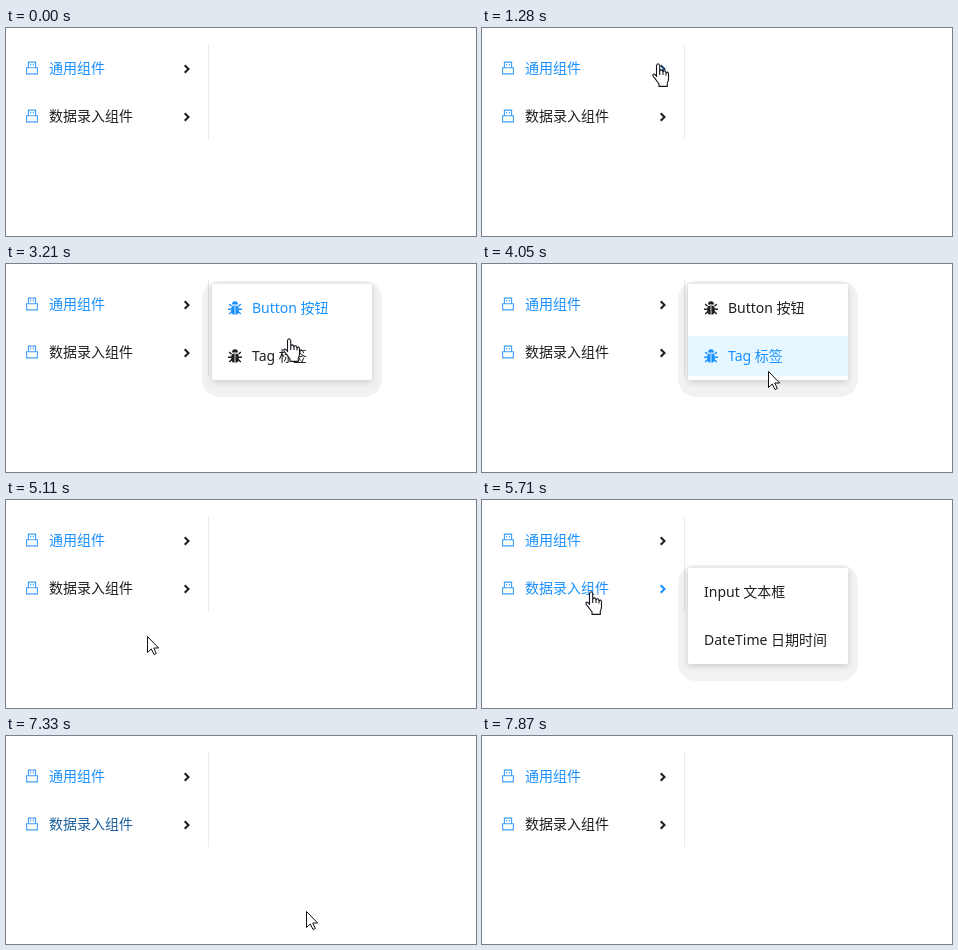
Recreate the animation shown at these times as an HTML page. Size 470x208 px, loop 8000 ms.

```html
<!DOCTYPE html>
<html lang="zh">
<head>
<meta charset="utf-8">
<style>
  html, body { margin: 0; width: 100%; height: 100%; overflow: hidden; background: #fff; }
  svg { display: block; }
  text { font: 14px "Noto Sans", "Noto Sans CJK SC", "Noto Sans CJK", sans-serif; white-space: pre; }
  .panel { fill: #fff; filter: drop-shadow(0 2px 3px rgba(0, 0, 0, .16)); }
</style>
</head>
<body>
<svg width="470" height="208" viewBox="0 0 470 208">
  <defs>
    <g id="usb" fill="none" stroke="#3f9ffa" stroke-width="1.1">
      <path d="M.6 6.2H11.4V12.4H.6ZM2.4 6V.6H9.6V6"/>
      <path d="M4 3.2H5.2M6.8 3.2H8" stroke-width="1.3"/>
    </g>
    <path id="chevron" d="M1.2 1.2 5 5 1.2 8.8" fill="none" stroke="currentColor" stroke-width="2.1"/>
    <g id="bug" fill="currentColor">
      <path d="M4 3.6a3 3.4 0 0 1 6 0Z"/>
      <rect x="3.2" y="4.4" width="7.6" height="9.2" rx="3.4"/>
      <path d="M3.5 5.2 1.2 3M3.5 8.2H0M3.8 10.6 1.2 13M10.5 5.2 12.8 3M10.5 8.2H14M10.2 10.6 12.8 13"
        fill="none" stroke="currentColor" stroke-width="1.4"/>
      <path d="M7 4.4V13.6" stroke="#fff" stroke-width=".8"/>
    </g>
  </defs>
  <path d="M202.5 16V111.5" stroke="#ebebeb"/>
  <g id="menu"></g>
  <g id="popups"></g>
  <g id="arrow"><path d="M.5.5V16.5L4.3 13 7 18.5 9.3 17.5 6.8 12H11.7Z" fill="#fff" stroke="#111"/></g>
  <g id="hand" stroke="#14141f" stroke-width="1.1" stroke-linejoin="round">
    <path fill="#fff" d="M4.5 14V2.5Q6 -1 7.7 2.5V8Q9.5 5.5 11 8.6Q13 6.5 14 9.7Q16.5 8 16.5 11.3V15.5Q16.5 18 15.3 20V23.4H7V20.8Q5.5 19.5 4 16.8L1 13Q.5 9 4.5 13"/>
    <path fill="none" d="M7.7 8V12M11 8.6V12M14 9.7V12.5"/>
  </g>
</svg>
<script>
const LOOP = 8000, STEP = 120, BLUE = '#1890ff', INK = '#1f1f1f';
const $ = id => document.getElementById(id);
const clamp = v => Math.min(1, Math.max(0, v));

// Ramp up at `on`, back down at `off`.
const level = (t, on, off, dur) => clamp((t - on) / dur) - clamp((t - off) / dur);
const tint = p => `color-mix(in srgb, ${BLUE} ${p * 100}%, ${INK})`;

// Pointer strokes: time, shape, left, top, then optionally sample count and end point.
const strokes = [
  [0, ''],
  [500, 'arrow', 189, 185, 2, 261, 104],
  [770, 'arrow', 250, 40, 4, 191, 29],
  [1280, 'hand', 170, 35, 2, 160, 33],
  [1550, 'hand', 156, 36],
  [2580, 'hand', 178, 37, 3, 222, 39],
  [2970, 'hand', 245, 44, 3, 277, 74],
  [3360, 'hand', 281, 95, 2, 281, 107],
  [4050, 'arrow', 286, 107, 3, 319, 129],
  [4440, 'arrow', 300, 142, 3, 226, 136],
  [5110, 'arrow', 141, 136],
  [5260, 'arrow', 109, 124],
  [5410, 'hand', 104, 100],
  [5560, 'hand', 101, 92],
  [5710, 'hand', 103, 91],
  [6400, 'hand', 243, 88],
  [6550, 'hand', 268, 92],
  [6700, 'hand', 266, 124, 2, 262, 143],
  [7090, 'arrow', 267, 143, 3, 300, 175],
  [7480, 'arrow', 335, 182, 3, 421, 193],
  [7870, '']
];
const pointer = strokes.flatMap(([time, shape, x = 0, y = 0, count = 1, endX = x, endY = y]) =>
  Array.from({ length: count }, (_, i) => {
    const p = i / Math.max(1, count - 1);
    return { time: time + i * STEP, shape, x: Math.round(x + (endX - x) * p), y: Math.round(y + (endY - y) * p) };
  }));
const clicks = [3930, 6970];
const ticks = pointer.map(p => p.time).concat(clicks).sort((a, b) => a - b);

const menu = [
  { label: '通用组件', y: 40, text: [-300, LOOP], chevron: [1180, 2780] },
  { label: '数据录入组件', y: 88, text: [5330, 7200], chevron: [5330, 6380] }
];
const popups = [
  { y: 20, open: 1300, close: 4090, icon: true, items: [
    { label: 'Button 按钮', hover: [2740, 3270] },
    { label: 'Tag 标签', hover: [3270, LOOP], selected: 3880 }] },
  { y: 68, open: 5460, close: 7030, items: [
    { label: 'Input 文本框', hover: [6250, 6600] },
    { label: 'DateTime 日期时间', hover: [6600, LOOP], selected: 6920 }] }
];

$('menu').innerHTML = menu.map(({ label, y }) => `
  <use href="#usb" x="20" y="${y - 6.5}"/>
  <text class="label" x="43" y="${y + 5}">${label}</text>
  <use class="mark" href="#chevron" x="177.5" y="${y - 4}"/>`).join('');

$('popups').innerHTML = popups.map(({ y, icon, items }) => `<g class="popup">
  <rect x="196" y="${y - 3}" width="180" height="116" rx="18" fill-opacity=".05"/>
  <rect class="panel" x="206" y="${y}" width="160" height="96" rx="2"/>` +
  items.map(({ label }, i) => `<g class="item">
    <rect x="206" y="${y + 4 + 48 * i}" width="160" height="40" fill="#e6f7ff"/>
    ${icon ? `<use href="#bug" x="222" y="${y + 17 + 48 * i}"/>` : ''}
    <text x="${icon ? 246 : 222}" y="${y + 29 + 48 * i}" fill="currentColor">${label}</text>
  </g>`).join('') + '</g>').join('');

const labels = document.querySelectorAll('.label');
const marks = document.querySelectorAll('.mark');
const panels = document.querySelectorAll('.popup');

function drawPopup(el, { y, open, close, items }, t) {
  const shown = 1 - (1 - level(t, open, close, 200)) ** (t < close ? 3 : 1);
  const scale = .8 + .2 * shown;
  el.setAttribute('opacity', shown);
  el.setAttribute('transform', `translate(206 ${y}) scale(${scale}) translate(-206 ${-y})`);
  el.querySelectorAll('.item').forEach((row, i) => {
    const { hover, selected = LOOP } = items[i];
    row.style.color = tint(level(t, ...hover, 150));
    row.firstElementChild.setAttribute('opacity', clamp((t - selected) / 100));
  });
}

function draw(now) {
  const time = now % LOOP;
  const t = ticks.findLast(tick => tick <= time);
  const { shape, x, y } = pointer.findLast(p => p.time <= t);
  menu.forEach((entry, i) => {
    labels[i].style.fill = tint(level(t, ...entry.text, 300));
    marks[i].style.color = tint(level(t, ...entry.chevron, 300));
  });
  popups.forEach((popup, i) => drawPopup(panels[i], popup, t));
  for (const id of ['arrow', 'hand']) {
    $(id).setAttribute('transform', `translate(${x} ${y})`);
    $(id).style.display = shape === id ? '' : 'none';
  }
}

const start = performance.now();
function loop() {
  draw(performance.now() - start);
  requestAnimationFrame(loop);
}
loop();
</script>
</body>
</html>
```
